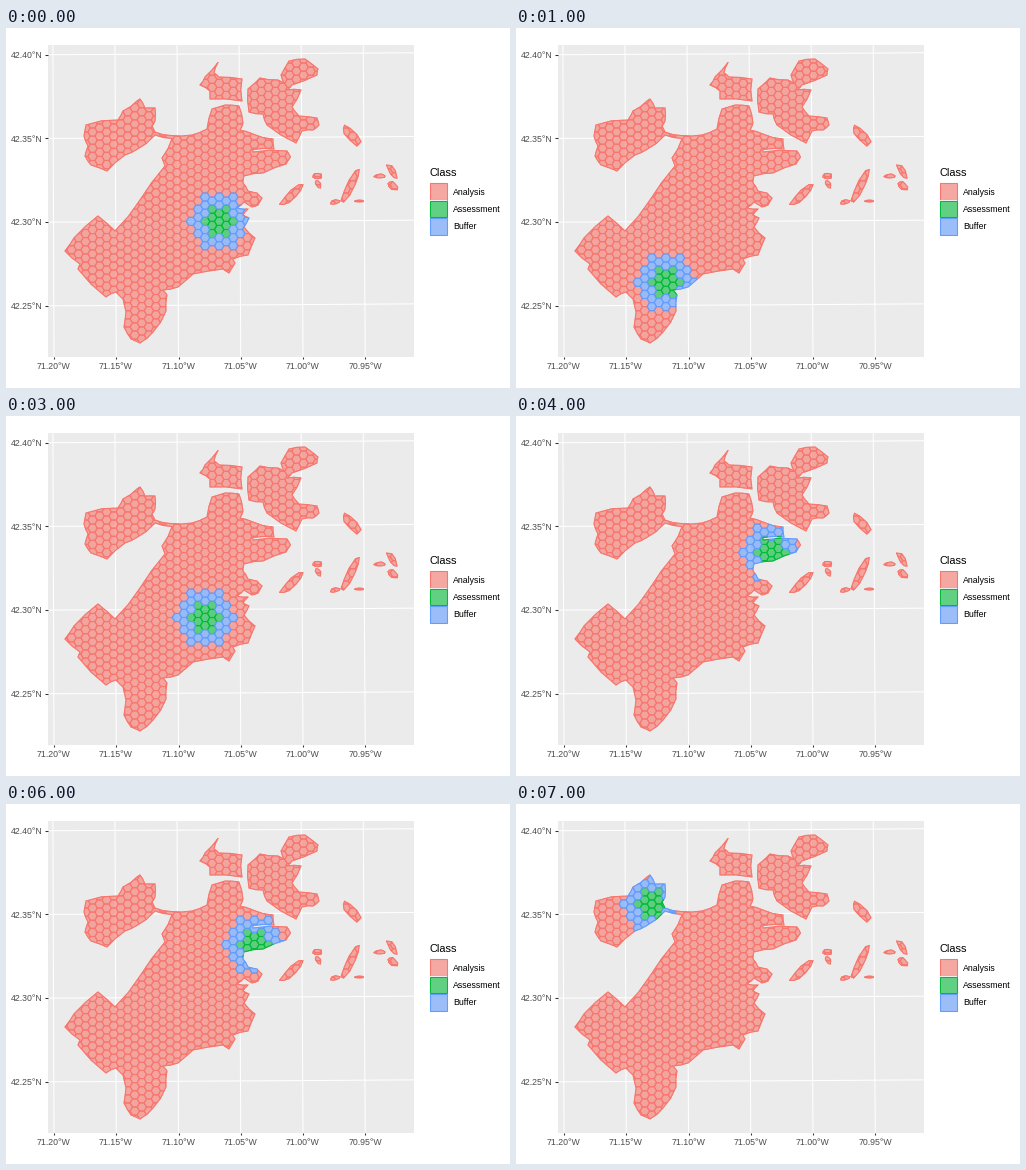
Recreate the animation shown at these times as a matplotlib script. Size 504 by 360 pixels, loop 8 s.

```python
import math
import random

import matplotlib.pyplot as plt
import numpy as np
from matplotlib.animation import FuncAnimation
from matplotlib.collections import LineCollection, PolyCollection
from matplotlib.colors import to_rgba
from matplotlib.patches import Rectangle
from matplotlib.path import Path

W, H = 504, 360
LEFT, RIGHT, TOP, BOTTOM = 42, 408, 17, 328.5
LINE = 1.07
CLASSES = [("Analysis", "#F8766D"), ("Assessment", "#00BA38"), ("Buffer", "#619CFF")]
FILLS = np.array([to_rgba(c, 0.6) for _, c in CLASSES])
STROKES = np.array([to_rgba(c) for _, c in CLASSES])

# Flat-topped hexagon grid, counted in columns and rows from ORIGIN
GAP = 8.12
SIDE = GAP / math.sqrt(3)
ORIGIN = np.array([199.1, 201.5])

# Column and row of the held-out disc's centre at each step
CENTRES = [(2, -1), (-7, 6.5), (12, -4), (0, 0),
           (8, -8), (-6, 0), (7, -7.5), (-9, -12.5)]

# Key points of the coasts, refined by roughen()
NORTH_COAST = [
    (131, 73), (134, 71), (139, 80), (149, 80), (149, 93), (146, 98), (149, 104),
    (165, 107.5), (186, 107), (201, 101), (206, 81), (219, 77), (233, 78),
    (237, 95), (234, 102), (247, 106), (267, 111), (268, 121), (247, 121.5),
    (247, 124), (281, 123), (284.5, 129), (280, 136), (257, 145), (238, 148),
]
SOUTH_COAST = [
    (237, 155), (242, 163), (251, 165), (256, 170), (252, 177), (246, 179),
    (238, 174), (231, 180), (242, 181), (237, 187), (243, 190), (238, 199),
    (249, 210), (242, 227), (227, 231), (229, 235), (223, 245), (217, 241),
    (187, 246), (172, 259), (157, 262), (161, 267), (160, 283), (147, 304),
    (134, 315), (125, 311), (118, 299), (120, 284), (117, 271), (110, 264),
]
WEST_BORDER = [
    (100, 269), (72, 241), (74, 236), (59, 223), (68, 210), (92, 188),
    (109, 203), (134, 172), (159, 138), (156, 130), (166, 110.5), (149, 107),
    (130, 122), (119, 127), (101, 143), (85, 137), (79, 128), (82, 118),
    (78, 108), (80, 97), (112, 92), (117, 83),
]
NORTH_HARBOUR = [
    (194, 57), (199, 49), (212, 34.5), (208, 45), (213, 49), (236, 51),
    (236, 73), (204, 71), (204, 63),
]
EAST_HARBOUR = [
    (242, 61), (254, 50), (272, 52), (278, 55), (275, 47), (283, 33), (299, 31),
    (312, 41), (311, 47), (286, 57), (281, 62), (295, 62), (286, 79), (293, 88),
    (311, 90), (313, 97), (307, 102), (296, 103), (290, 115), (261, 97),
    (257, 86), (243, 84),
]
# Centre, length, width and tilt in degrees
ISLETS = [
    (286, 167, 30, 9, -43), (311, 148, 10, 6, 0), (312, 156, 9, 5, 60),
    (346, 108, 26, 9, 48), (345, 157, 37, 8, -62), (329, 174, 10, 4, -15),
    (386, 143, 16, 6, 55), (374, 148, 12, 4, 0), (387, 158, 11, 7, 40),
    (353, 173, 10, 2, 0),
]


def roughen(points, amount=0.06):
    """Push the middle of each edge a little to one side."""
    out = []
    for (ax, ay), (bx, by) in zip(points, points[1:] + points[:1]):
        push = random.uniform(-amount, amount)
        out += [(ax, ay), ((ax + bx) / 2 - push * (by - ay),
                           (ay + by) / 2 + push * (bx - ax))]
    return out


def islet(x, y, length, width, tilt):
    turn = math.radians(tilt)
    points = []
    for k in range(9):
        a = k * math.tau / 9
        r = random.uniform(0.8, 1.1)
        u, v = r * length / 2 * math.cos(a), r * width / 2 * math.sin(a)
        points.append((x + u * math.cos(turn) - v * math.sin(turn),
                       y + u * math.sin(turn) + v * math.cos(turn)))
    return points


def place(col, row):
    return ORIGIN + (col * 1.5 * SIDE, row * GAP)


def coast_pieces(land, step=1.5):
    """Split an outline into short segments that can be coloured singly."""
    pieces = []
    for a, b in zip(land, land[1:] + land[:1]):
        count = max(1, round(math.dist(a, b) / step))
        line = np.linspace(a, b, count + 1)
        pieces += list(zip(line[:-1], line[1:]))
    return pieces


def classify(centre):
    dist = np.hypot(*(hubs - centre).T) / GAP
    return np.where(dist < 1.8, 1, np.where(dist < 3.5, 2, 0))


def label(x, y, text, size=8.8, color="#4D4D4D", ha="center"):
    ax.text(x, y, text, size=size, color=color, ha=ha, va="baseline",
            family="Liberation Sans")


def draw_panel():
    ax.add_patch(Rectangle((LEFT, TOP), RIGHT - LEFT, BOTTOM - TOP, fc="#EBEBEB", lw=0))
    tick = dict(color="#333333", lw=LINE, solid_capstyle="butt")
    grid = dict(color="white", lw=LINE, solid_capstyle="butt")
    u = np.linspace(0, RIGHT - LEFT, 40)
    for i in range(4):
        y = 26.7 + 83.7 * i
        ax.plot(LEFT + u, y - 0.00358 * u - 4.7e-6 * u * u, **grid)
        ax.plot([LEFT - 2.75, LEFT], [y, y], **tick)
        label(37, y + 3.1, f"{42.4 - 0.05 * i:.2f}°N", ha="right")
    for i in range(6):
        x = 48 + 62.25 * i
        lean = (BOTTOM - TOP) * 0.673 * math.radians(0.3 + 0.05 * i)
        ax.plot([x, x - lean], [BOTTOM, TOP], **grid)
        ax.plot([x, x], [BOTTOM, BOTTOM + 2.75], **tick)
        label(x - 0.3, 341, f"{71.2 - 0.05 * i:.2f}°W")


def draw_legend():
    label(424, 148, "Class", 11, "black", "left")
    key, inset = 17.28, 0.28
    for i, (name, color) in enumerate(CLASSES):
        y = 155 + key * i
        ax.add_patch(Rectangle((424.2, y), key, key, fc="#F2F2F2", lw=0))
        ax.add_patch(Rectangle((424.2 + inset, y + inset), key - 2 * inset,
                               key - 2 * inset, fc=FILLS[i], ec=color, lw=LINE))
        label(447, y + key / 2 + 3.1, name, color="black", ha="left")


random.seed(4)
mainland = NORTH_COAST + SOUTH_COAST + WEST_BORDER
lands = [roughen(p) for p in (mainland, NORTH_HARBOUR, EAST_HARBOUR)]
lands += [islet(*spec) for spec in ISLETS]

hubs = np.array([place(col, row + 0.5 * (col % 2))
                 for row in range(-22, 16) for col in range(-21, 29)])
turns = np.arange(6) * math.pi / 3
hexes = hubs[:, None] + SIDE * np.column_stack([np.cos(turns), np.sin(turns)])

shore = [piece for land in lands for piece in coast_pieces(land)]
middles = np.mean(shore, axis=1)
nearest = [np.argmin(np.hypot(*(hubs - m).T)) for m in middles]

fig = plt.figure(figsize=(W / 72, H / 72), dpi=72, facecolor="white")
ax = fig.add_axes([0, 0, 1, 1])
ax.set_xlim(0, W)
ax.set_ylim(H, 0)
ax.axis("off")
draw_panel()
draw_legend()

tiles = PolyCollection([], linewidths=LINE, joinstyle="round", zorder=3)
coast = LineCollection(shore, linewidths=LINE, capstyle="round", zorder=4)
for part in (tiles, coast):
    ax.add_collection(part, autolim=False)
outline = Path.make_compound_path(*[Path(land + land[:1], closed=True) for land in lands])
tiles.set_clip_path(outline, ax.transData)


def update(step):
    kinds = classify(place(*CENTRES[step]))
    order = np.argsort(kinds, kind="stable")
    tiles.set_verts(hexes[order])
    tiles.set_facecolor(FILLS[kinds[order]])
    tiles.set_edgecolor(STROKES[kinds[order]])
    coast.set_color(STROKES[kinds[nearest]])
    return [tiles, coast]


anim = FuncAnimation(fig, update, frames=len(CENTRES), interval=1000, repeat=True)
plt.show()
```
